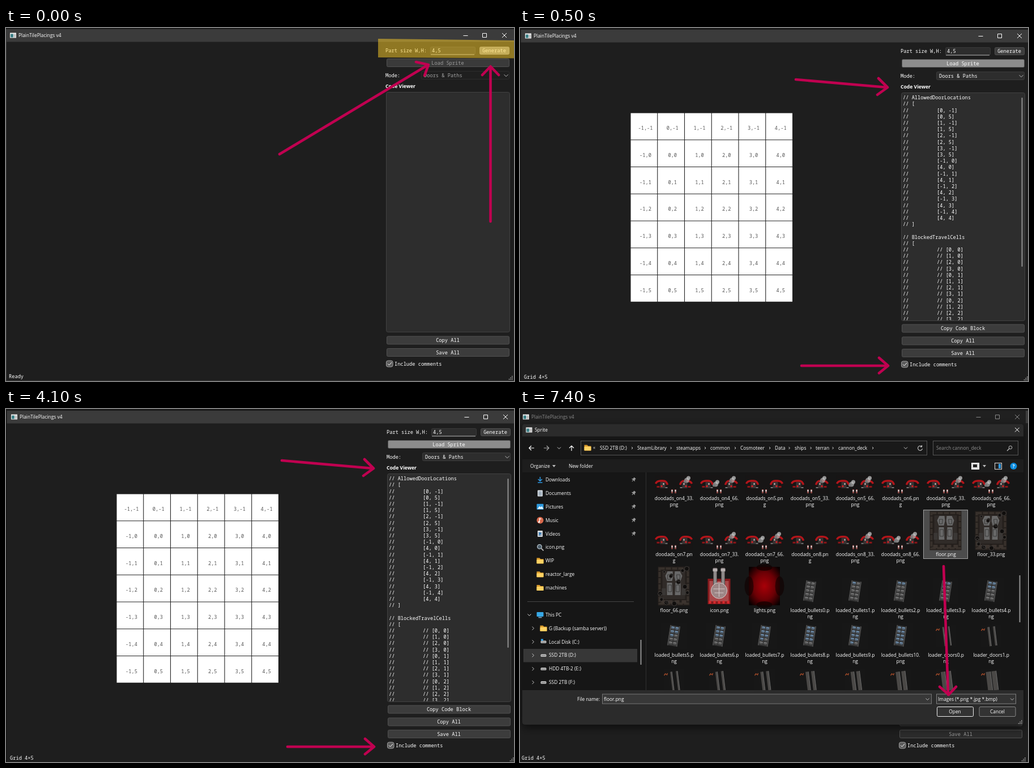
An HTML page for the animation above (8000 ms loop, 897x624 px).

```html
<!DOCTYPE html>
<html lang="en">
<head>
<meta charset="utf-8">
<title>Grid tool walkthrough</title>
<style>
  html, body { margin: 0; width: 100%; height: 100%; overflow: hidden; background: #1e1e1e; }
  #stage { display: block; width: 897px; height: 624px; }
  text { font: 8.4px "Open Sans", sans-serif; fill: #fff; white-space: pre; }
  .mono { font: 8.7px "Noto Sans Mono", monospace; }
  .bold { font-size: 8.6px; font-weight: 700; }
  .mid { text-anchor: middle; }
  .arrow { fill: none; stroke: #c00050; stroke-width: 4.6; stroke-linecap: round; stroke-linejoin: round; }
</style>
</head>
<body>
<svg id="stage" viewBox="0 0 897 624"></svg>
<script>
const range = n => [...Array(n).keys()];
const draw = (n, f) => range(n).map(f).join('');
const rect = (x, y, w, h, fill, more = '') =>
  `<rect x="${x}" y="${y}" width="${w}" height="${h}" fill="${fill}" ${more}/>`;
const box = (x, y, w, h, fill, stroke, r = 2) =>
  rect(x + .5, y + .5, w - 1, h - 1, fill, `stroke="${stroke}" rx="${r}"`);
const line = (d, stroke = '#fff', width = 1, more = '') =>
  `<path d="${d}" fill="none" stroke="${stroke}" stroke-width="${width}" ${more}/>`;
const shape = (d, fill) => `<path d="${d}" fill="${fill}"/>`;
const circle = (x, y, r, fill, more = '') => `<circle cx="${x}" cy="${y}" r="${r}" fill="${fill}" ${more}/>`;
// y is the middle of the capitals
const text = (x, y, s, cls = '', fill = '#fff') =>
  `<text x="${x}" y="${y + 3}" class="${cls}" style="fill:${fill}">${s}</text>`;
const mono = (x, y, s, fill) => text(x, y, s, 'mono', fill);
const move = (x, y, s, more = '') => `<g transform="translate(${x} ${y}) ${more}">${s}</g>`;
const arrow = (shaft, head) => `<path class="arrow" d="M${shaft}M${head}"/>`;
const down = (x, y, stroke, s = 3.5) => line(`M${x - s} ${y - s / 2}l${s} ${s}l${s} ${-s}`, stroke);
const right = (x, y, stroke, s = 2) => line(`M${x - s / 2} ${y - s}l${s} ${s}l${-s} ${s}`, stroke);
const button = (y, label, fill = '#3c3c3c', color = '#fff') =>
  box(672, y - 7.5, 217, 15, fill, '#505050') + text(780, y, label, 'mono mid', color);

const appIcon = (x, y) => rect(x, y, 11, 9, '#eee') + rect(x + 1, y + 2, 5, 6, '#3b7f86') + rect(x + 7, y + 2, 3, 6, '#bbb');

const titleBar = (fill, color) => rect(-4, 2, 905, 22.5, fill) + appIcon(7, 8.5) +
  text(22, 13, 'PlainTilePlacings v4', '', color) +
  line('M807.5 13.5h8M841.5 9.5h7v7h-7zM876 9l8 8m0-8l-8 8', color);

const grip = draw(3, r => draw(r + 1, c => rect(893 - c * 2.6, 615 + r * 2.6, 1.5, 1.5, '#aaa')));

function appWindow({ state, status, dim = '#fff' }) {
  const empty = state === 0, behind = state === 2;
  return rect(-4, 2, 905, 624, '#1e1e1e') +
    titleBar(behind ? '#202020' : '#3b3b3b', behind ? '#8a8a8a' : '#fff') +
    mono(670, 40, 'Part size W,H:') +
    box(749, 33, 80, 14, '#2d2d2d', '#3a3a3a') + line('M750 47h77', '#b5b5b5') + mono(752, 40, '4,5') +
    box(836, 33, 53, 14, empty ? '#8c8c8c' : '#3c3c3c', empty ? '#999' : '#505050') +
    text(862, 40, 'Generate', 'mono mid') +
    button(61.5, 'Load Sprite', empty ? '#3a3a3a' : '#8c8c8c', empty ? '#9b9b9b' : '#fff') +
    mono(670, 83.5, 'Mode:') +
    box(733, 76, 156, 15, empty ? '#1f1f1f' : '#2d2d2d', empty ? '#2c2c2c' : '#3c3c3c') +
    mono(738, 83.5, 'Doors &amp; Paths', empty ? '#a5a5a5' : '#fff') + down(883, 84, '#bbb') +
    text(670, 102.5, 'Code Viewer', 'bold') +
    box(671, 113, 219, empty ? 425 : 404, '#2d2d2d', '#414141', 3) +
    (empty ? '' : button(530, 'Copy Code Block')) +
    button(552, 'Copy All', behind ? '#2b2b2b' : '#3c3c3c', dim) +
    button(573.5, 'Save All', behind ? '#2b2b2b' : '#3c3c3c', dim) +
    box(671, 587.5, 12.5, 12, '#5c5c5c', '#a0a0a0', 3) + line('M674 593.5l2.5 2.5 4.5-5') +
    mono(686, 593.5, 'Include comments') + mono(5, 615.5, status) + grip;
}

const pair = (x, y) => `[${x}, ${y}]`;
function codeView() {
  const doors = [...range(4).flatMap(x => [pair(x, -1), pair(x, 5)]),
                 ...range(5).flatMap(y => [pair(-1, y), pair(4, y)])];
  const blocked = range(12).map(i => '// ' + pair(i % 4, i >> 2));
  const lines = [['// AllowedDoorLocations'], ['// ['], ...doors.map(d => ['//', d]), ['// ]'], [''],
                 ['// BlockedTravelCells'], ['// ['], ...blocked.map(b => ['//', b])];
  return `<svg x="673" y="116" width="212" height="400.5">` +
    lines.map(([a, b = ''], i) => mono(3, 7.2 + i * 11.2, a) + mono(63, 7.2 + i * 11.2, b)).join('') +
    '</svg>' + rect(885.5, 123, 2, 299, '#8f8f8f', 'rx="1"');
}

function cellGrid() {
  const s = 47.75;
  return rect(195, 150, 286.5, 334, '#fff') +
    draw(7, c => line(`M${195 + c * s} 150v334`, '#222', 1.1)) +
    draw(8, r => line(`M195 ${150 + r * s}h286.5`, '#222', 1.1)) +
    draw(42, i => {
      const c = i % 6, r = Math.floor(i / 6);
      return text(221.5 + c * s, 177 + r * s, `${c - 1},${r - 1}`, 'mono mid', '#555');
    });
}

// Thumbnails, each around its own centre
const puff = (x, y) => circle(x, y, 4.5, '#aaa', 'opacity=".75"') + circle(x + 3, y - 4, 3.5, '#ccc', 'opacity=".7"') +
  circle(x - 3, y + 2, 2.5, '#777');
const doodads = phase => rect(-33, -17, 66, 34, '#171515') +
  [-1, 1].map(s => `<g transform="scale(${s} 1)">` +
    line('M11 0q2-7 8-7h4q7 0 9 5', '#b3151a', 3.5) + rect(15, -5, 9, 11, '#3a3434') +
    rect(17, -3, 2, 3, '#c9b9b9') + rect(20, 1, 3, 3, '#d02024') + rect(25, 2, 5, 3, '#8d1518') +
    rect(11, 4, 4, 2, '#777') + rect(1.5, 8, 3, 7, '#8c4b48') + rect(2, 9, 2, 3, '#ddd') + '</g>').join('') +
  (phase ? puff(23, -8) : '') + (phase === 2 ? puff(-6, -1) : '');

const cannons = fill => [-1, 1].map(s => `<g transform="scale(${s} 1)">` +
  shape('M2-26h9l4 8-3 9h-9l-2-8z', fill) + shape('M3-6h9v22h-10z', fill) +
  line('M5-20h6v8h-5zM4-2h6v12h-6z', '#3b3a39') + rect(14, 4, 7, 12, '#3a3735') + '</g>').join('');
const floor = damaged => rect(-28, -34.5, 56, 69, '#241f1c') +
  line('M-25-31h50v62h-50z', '#37302b', 4, 'stroke-dasharray="9 2"') +
  rect(-20, -27, 40, 50, '#302b28') + cannons('#686868') +
  draw(4, i => rect(-22 + i * 12, 25, 8, 6, '#3c342f')) +
  (damaged ? draw(20, i => circle(Math.sin(i * 2.4) * 24, Math.cos(i * 3.7) * 31, 2 + i % 3, '#100e0d',
    'stroke="#4a4643" stroke-width=".8"')) : '');
const turret = () => rect(-20, -13, 40, 45, '#861a1d') + rect(-17, -9, 34, 36, '#a9484a') +
  [-7, 7].map(x => rect(x - 3, -32, 6, 39, '#8d8888', 'stroke="#4b4242"') + rect(x - 4, -31, 8, 5, '#b8b0b0')).join('') +
  circle(0, 8, 14, '#9d8686', 'stroke="#d7c7c7"') + line('M-10 5h20M-8 12h16M0-4v23', '#d6c9c9') +
  draw(5, i => rect(-18 + i * 8, 26, 4, 5, '#d42a2e'));
const lights = () => rect(-27.5, -34, 55, 68, '#080000') + rect(-27.5, -34, 55, 68, 'url(#glow)') +
  [-1, 1].map(s => `<ellipse cx="${s * 27}" cy="0" rx="8" ry="17" fill="#100000" opacity=".6"/>`).join('') +
  [-1, 1].map(s => `<ellipse cx="0" cy="${s * 33}" rx="14" ry="6" fill="#100000" opacity=".7"/>`).join('');
const bullets = n => rect(-23, -23, 46, 46, '#171717') + move(0, 0,
  rect(-9, -18, 18, 36, '#353535') + line('M-8-18v36M8-18v36', '#4f4f4f', 1.5) +
  draw(10, i => rect(i % 2 ? .8 : -6.5, -16 + (i >> 1) * 6.7, 5.7, 4.2, i < n ? '#6f8fae' : '#777', 'rx="1"') +
    rect(i % 2 ? .8 : -6.5, -13.6 + (i >> 1) * 6.7, 5.7, 1, '#333')), 'rotate(9)');
const loader = thick => rect(-18, -20, 37, 40, '#171717') + line('M-17-9l2-3 3 2 1-3', '#a34b29', 1.4) +
  move(0, 0, [-3, 7].map(x => rect(x - thick / 2, -16, thick, 34, '#4a4846') +
    line(`M${x + thick / 2}-16v34`, '#777', .8)).join(''), 'rotate(-7)');

// [column, thumbnail centre, label centre, thumbnail, first line, second line]
function fileList() {
  const colX = c => 271.5 + c * 80;
  const item = (c, y, thumb, labelY, a = '', b = '') => move(colX(c), y, thumb) +
    text(colX(c) + .5, labelY, a, 'mid') + text(colX(c) + .5, labelY + 11.3, b, 'mid');
  const smoke = ['', '_33', '_66'];
  const doodad = (c, row, k) => {
    const phase = k % 3, name = `doodads_on${4 + Math.floor(k / 3)}${smoke[phase]}.`;
    return item(c, 134 + row * 98.7, doodads(phase), 158 + row * 98.7,
      phase ? name : name + 'pn', phase ? 'png' : 'g');
  };
  const bullet = (c, y, labelY, n) => item(c, y, bullets(n), labelY,
    `loaded_bullets${n}.` + (n < 10 ? 'p' : ''), n < 10 ? 'ng' : 'png');
  return `<svg x="0" y="112" width="889" height="385" viewBox="0 112 889 385">` +
    draw(8, c => doodad(c, 0, c + 1)) + draw(6, c => doodad(c, 1, c + 9)) +
    box(712, 178, 79, 87, '#4c4c4c', '#a0a0a0', 0) +
    item(6, 215, floor(false), 257, 'floor.png') + item(7, 215, floor(true), 257, 'floor_33.png') +
    item(0, 313, floor(true), 356, 'floor_66.png') + item(1, 313, turret(), 356, 'icon.png') +
    item(2, 313, lights(), 356, 'lights.png') +
    draw(5, i => bullet(i + 3, 322, 356, i)) + draw(6, i => bullet(i, 401, 435, i + 5)) +
    draw(2, i => item(i + 6, 401, loader(2.2 + i), 435, `loader_doors${i}.p`, 'ng')) +
    draw(8, c => item(c, 480, loader(3 + c * .75), 515)) + '</svg>';
}

const folder = (x, y) => shape(`M${x - 6} ${y - 5}h5l2 2h5v8h-12z`, '#d99a2b') + rect(x - 6, y - 2, 12, 7, '#ffd263', 'rx="1"');
const drive = (x, y) => rect(x - 5, y - 2, 10, 4.5, '#ccc', 'rx="1.5"') + rect(x - 4, y, 8, 1, '#555');
const page = (x, y) => rect(x - 4.5, y - 5.5, 9, 11, '#d5dbe0', 'rx="1"') + line(`M${x - 3} ${y - 2}h6m-6 2.5h6m-6 2.5h6`, '#58728a');
const monitor = (x, y) => rect(x - 6, y - 5, 12, 8, '#37a8e6', 'rx="1"') + line(`M${x - 3} ${y + 4.5}h6`, '#8bd', 1.5);
const icons = {
  Downloads: (x, y) => line(`M${x} ${y - 5}v7m-3.5-3l3.5 3.5 3.5-3.5M${x - 4} ${y + 5}h8`, '#2f9be8', 1.5),
  Documents: page,
  Pictures: (x, y) => rect(x - 6, y - 5, 12, 10, '#2d9be0', 'rx="1"') + shape(`M${x - 5} ${y + 4}l4-5 2 2 2-2 3 5z`, '#e8f5ff'),
  Music: (x, y) => circle(x, y, 6, '#d8694c') + line(`M${x - 1} ${y + 3}v-6l3 1`, '#fff', 1.3) + circle(x - 2, y + 3, 1.5, '#fff'),
  Videos: (x, y) => page(x, y) + shape(`M${x - 2} ${y - 3}l5 3-5 3z`, '#2f78b8'),
  'icon.png': (x, y) => circle(x - 1, y - 1, 3.8, '#4b5c68', 'stroke="#b7c4cc" stroke-width="1.3"') + line(`M${x + 2} ${y + 2}l4 4`, '#bbb', 1.8),
  WIP: folder, reactor_large: folder, machines: folder
};

function sidebar() {
  const rowY = i => 125 + i * 23.88;
  const drives = ['G (Backup (samba server))', 'Local Disk (C:)', 'SSD 2TB (D:)', 'HDD 4TB-2 (E:)', 'SSD 2TB (F:)'];
  const pin = y => move(200.5, y, shape('M-2-4h4v3l2 2h-8l2-2z', '#999') + line('M0 1v3', '#999'), 'rotate(40)');
  return Object.entries(icons).map(([name, icon], i) => icon(35.5, rowY(i)) + text(45, rowY(i), name) +
      (i < 5 ? pin(rowY(i)) : '')).join('') +
    line('M13 340.5h188', '#454545') + down(16.5, 364, '#ddd', 3) + monitor(35.5, 364) + text(45, 363.5, 'This PC') +
    rect(6, 424, 201, 23.5, '#373737') +
    drives.map((name, i) => {
      const y = rowY(i + 11);
      const icon = i ? drive(41.5, y) + (i === 1 ? rect(37, y - 5, 4, 3, '#35a5e8') : '') : folder(41.5, y);
      return right(23, y, '#ccc', 3) + icon + text(51, y, name);
    }).join('') +
    rect(212.5, 408, 2, 44, '#8f8f8f') + line('M222.5 112v385', '#303030');
}

function addressBar() {
  const crumbs = [[141, 'SSD 2TB (D:)', 198], [207, 'SteamLibrary', 266.5], [276, 'steamapps', 327], [336, 'common', 380],
    [389, 'Cosmoteer', 441], [450, 'Data', 475.5], [485, 'ships', 513.5], [522, 'terran', 552.5], [562, 'cannon_deck', 623]];
  return line('M25 69h-9m4-4l-4 4 4 4M91 74v-9m-4 4l4-4 4 4', '#fff', 1.2) +
    line('M42 69h9m-4-4l4 4-4 4', '#aaa', 1.2) + down(69, 69, '#ccc', 3) +
    box(107, 56, 612, 26, '#191919', '#555', 0) + box(729, 56, 151, 26, '#191919', '#555', 0) +
    folder(119.5, 68.5) + text(129, 68, '«', '', '#ccc') +
    crumbs.map(([x, name, next]) => text(x, 69, name) + right(next, 69, '#ddd')).join('') +
    down(681, 69, '#ccc', 3) + line('M709 66a4 4 0 1 0 1.5 4M709.5 64v3h-3', '#ccc', 1.1) +
    text(735, 69, 'Search cannon_deck', '', '#8f8f8f') + circle(866, 68, 2.8, 'none', 'stroke="#bbb"') + line('M864 70l-4 4', '#bbb', 1.2);
}

function dialog() {
  const triangle = x => shape(`M${x - 3} 99h6l-3 4z`, '#bbb');
  return rect(4, 26, 885, 532, '#191919', 'rx="5" filter="url(#shadow)"') +
    shape('M4 48.5v-17q0-5 5-5h875q5 0 5 5v17z', '#2b2b2b') + appIcon(10.5, 32.5) + text(26, 37, 'Sprite') +
    line('M874 33l7.5 7.5m0-7.5l-7.5 7.5') + addressBar() +
    rect(4, 89, 885, 23, '#1d1d1d') + text(18, 101, 'Organize') + triangle(60) + text(86, 101, 'New folder') +
    box(797, 95, 14, 12, '#ddd', '#fff', 0) + rect(800, 98, 7, 5, '#222') + triangle(820) +
    box(838, 95, 13, 12, '#222', '#ddd', 0) + rect(845, 97, 4, 8, '#2f9be8') +
    circle(871.5, 101, 6, '#0c8de0') + text(871.5, 101, '?', 'mid bold') +
    sidebar() + fileList() + rect(881.5, 294, 2, 83, '#8f8f8f') +
    shape('M4 497h885v56q0 5-5 5h-875q-5 0-5-5z', '#2b2b2b') +
    text(101, 512.5, 'File name:') + box(145, 503.5, 582, 18, '#383838', '#777', 0) + text(148, 513, 'floor.png') + down(719.5, 513, '#bbb', 3) +
    box(735, 503.5, 141, 18, '#333', '#808080', 0) + text(738, 512.5, 'Images (*.png *.jpg *.bmp)') + down(869, 513, '#bbb', 3) +
    box(736, 526, 65, 18, '#333', '#f0f0f0') + text(768, 535, 'Open', 'mid') +
    box(810.5, 526, 65, 18, '#333', '#8a8a8a') + text(843, 535, 'Cancel', 'mid') + move(-8, -65, grip);
}

const scenes = [
  appWindow({ state: 0, status: 'Ready' }) + line('M.5 2v622M0 623.5h897', '#3a3a3a') +
    shape('M657 19L897 22V53.5L657 52z', 'rgba(255,208,40,.5)') +
    arrow('483 223L744 66', '724 60L746 65 739 84') + arrow('855.5 342V69', '841 83L855.5 68 870 83'),
  move(2, 1, appWindow({ state: 1, status: 'Grid 4×5' })) + rect(0, 2, 1.5, 622, '#141414') +
    cellGrid() + codeView() +
    arrow('487 91L648 105', '633 89L649 105 631 118') + arrow('497 597H649', '634 583L650 597 634 610'),
  move(-2, 1, appWindow({ state: 2, status: 'Grid 4×5', dim: '#999' })) + rect(893, 3, 4, 22, '#3b3b3b') +
    dialog() + arrow('748 278L756 505', '741 491L757 505 770 491')
];

const stage = document.getElementById('stage');
stage.innerHTML = `<defs>
  <radialGradient id="glow" r=".65"><stop offset="0" stop-color="#a80008"/><stop offset=".55" stop-color="#6c0005"/><stop offset="1" stop-color="#080000"/></radialGradient>
  <filter id="shadow" x="-5%" y="-5%" width="110%" height="115%"><feDropShadow dx="0" dy="5" stdDeviation="8" flood-opacity=".6"/></filter>
  </defs>` + rect(0, 0, 897, 624, '#1a1a1a') + scenes.map(s => `<g class="scene">${s}</g>`).join('');
const groups = [...stage.querySelectorAll('.scene')];

const start = performance.now();
function tick() {
  const t = (performance.now() - start) % 8000;
  const current = t < 500 ? 0 : t < 6500 ? 1 : 2;
  groups.forEach((g, i) => g.style.display = i === current ? '' : 'none');
  requestAnimationFrame(tick);
}
tick();
</script>
</body>
</html>
```
